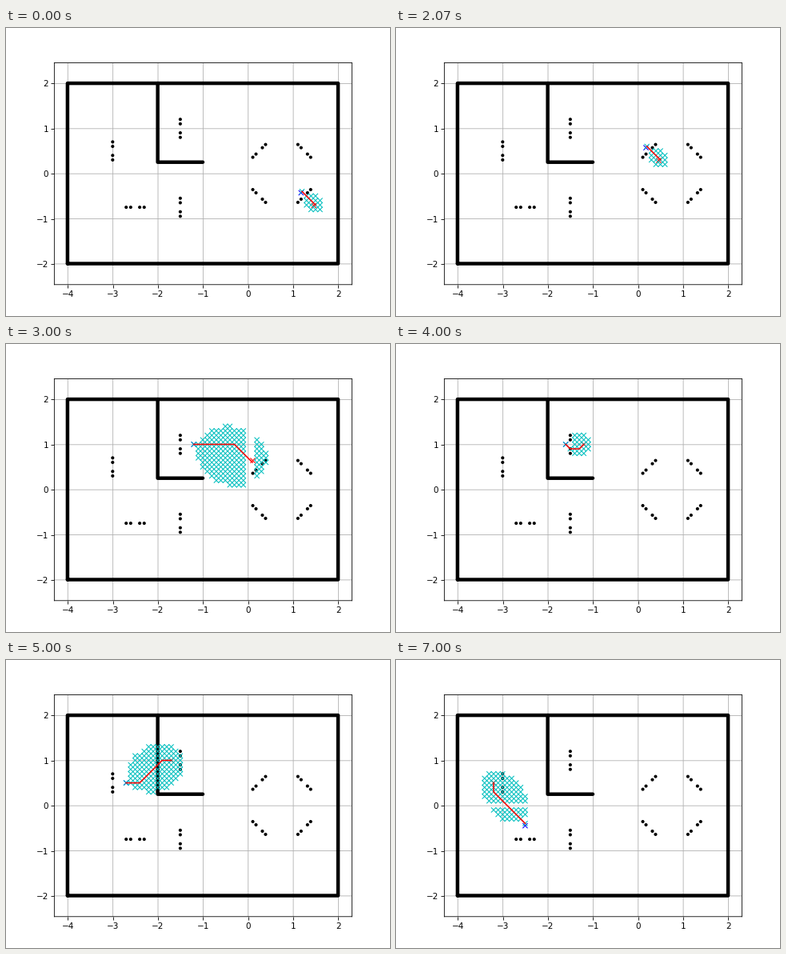
A matplotlib script for the animation above (8000 ms loop, 480 by 360 pixels).

```python
import numpy as np
import matplotlib.pyplot as plt
from matplotlib.animation import FuncAnimation
from matplotlib.collections import LineCollection
from matplotlib.transforms import Affine2D

plt.rcParams["path.snap"] = False

CELL = 0.1                   # grid cell size
NEAR, PASS, LEAVE = -0.3, 0.1, 0.2   # distances along a gate's axis
SPAN = 6.6                   # width of the map view
ARM = 3 / 72 * SPAN / (6.4 * 0.775)  # half size of a cross

# x, y, direction of travel through the gate in degrees
GATES = {
    "A": (1.25, -0.5, 135), "B": (0.25, 0.5, 135),
    "C": (-1.5, 1.0, 180), "D": (-3.0, 0.5, 180),
    "E": (-2.5, -0.75, 270), "F": (-1.5, -0.75, 0),
    "G": (1.25, 0.5, 45), "H": (0.25, -0.5, 45),
}
WALLS = [[(-4, -2), (2, -2), (2, 2), (-4, 2), (-4, -2)],
         [(-2, 2), (-2, 0.25), (-1, 0.25)]]


def along(gate, dist, turn=0):
    x, y, deg = GATES[gate]
    a = np.radians(deg + turn)
    return np.array([x + dist * np.cos(a), y + dist * np.sin(a)])


def snap(point):
    return np.round(np.asarray(point) / CELL) * CELL


def crosses(points):
    d, e = np.array([ARM, ARM]), np.array([ARM, -ARM])
    return [(p - v, p + v) for p in points for v in (d, e)]


def path_cells(path):
    for p, q in zip(path, path[1:]):
        n = round(np.abs(q - p).max() / CELL)
        for t in np.linspace(0, 1, n + 1):
            yield p + t * (q - p)


def search(path, lead, width):
    """Cells in an ellipse that points from start to goal, plus the path."""
    start, goal = path[0], path[-1]
    leg = goal - start
    length = np.hypot(*leg)
    ux, uy = leg / length
    grid = np.mgrid[-40:21, -20:21].reshape(2, -1).T * CELL
    x, y = (grid - start - lead * leg).T
    inside = (((x * ux + y * uy) / (0.58 * length)) ** 2
              + ((y * ux - x * uy) / width) ** 2) <= 1
    cells = np.vstack([grid[inside], list(path_cells(path))])
    # the search leaves out the cells on the zero lines
    i, j = np.round(cells / CELL).T
    cells = cells[(i != 0) & (i != 1) & (j != 0)]
    return np.unique(np.round(cells, 3), axis=0)


def leg(start, goal, lead, width, *bends):
    path = np.array([snap(start), *bends, snap(goal)])
    return start, goal, search(path, lead, width), path


def through(gate, width, *bends):
    return leg(along(gate, NEAR), along(gate, PASS), 0.14, width, *bends)


def between(gate, after, width, *bends):
    return leg(along(gate, LEAVE), along(after, NEAR), 0.35, width, *bends)


LEGS = [
    through("A", 0.2),
    between("A", "B", 0.33, (1.1, -0.3)),
    through("B", 0.2),
    between("B", "C", 0.65, (-0.3, 1.0)),
    through("C", 0.265, (-1.3, 0.9), (-1.5, 0.9)),
    between("C", "D", 0.5, (-1.9, 1.0), (-2.4, 0.5)),
    through("D", 0.16),
    between("D", "E", 0.42, (-3.2, 0.3)),
]

fig, ax = plt.subplots(figsize=(6.4, 4.8), dpi=75)
# frame and grid sit a fraction of a pixel right of and below the data
dx, dy = 0.5 / 640, 0.5 / 480
fig.subplots_adjust(left=0.125 + dx, right=0.9 + dx,
                    bottom=0.11 - dy, top=0.88 - dy)
data = Affine2D().translate(-dx * 480, dy * 360)
data = ax.transData + data

half = SPAN / 2 * (4.8 * 0.77) / (6.4 * 0.775)   # equal scale on both axes
ax.set(xlim=(-4.3, 2.3), ylim=(-half, half),
       xticks=range(-4, 3), yticks=range(-2, 3))
ax.grid(True)


def strokes(segments, color, width, cap="butt"):
    lines = LineCollection(segments, colors=color, linewidths=width,
                           capstyle=cap, joinstyle="round",
                           transform=data, zorder=2)
    return ax.add_collection(lines, autolim=False)


dots = [along(g, d, 90) for g in GATES for d in (-0.2, -0.1, 0.1, 0.2)]
strokes(WALLS, "k", 4.3, "round")
strokes([(p, p + [0.001, 0]) for p in dots], "k", 4, "round")

start_mark = strokes([], "r", 1)
goal_mark = strokes([], "b", 1)
visited = strokes([], "c", 1)
path_line, = ax.plot([], [], "-r", transform=data)


def draw(i):
    start, goal, cells, path = LEGS[i]
    start_mark.set_segments(crosses([start]))
    goal_mark.set_segments(crosses([goal]))
    visited.set_segments(crosses(cells))
    path_line.set_data(*path.T)
    return start_mark, goal_mark, visited, path_line


anim = FuncAnimation(fig, draw, frames=len(LEGS), interval=1000,
                     repeat=True, repeat_delay=0, blit=False)
plt.show()
```
